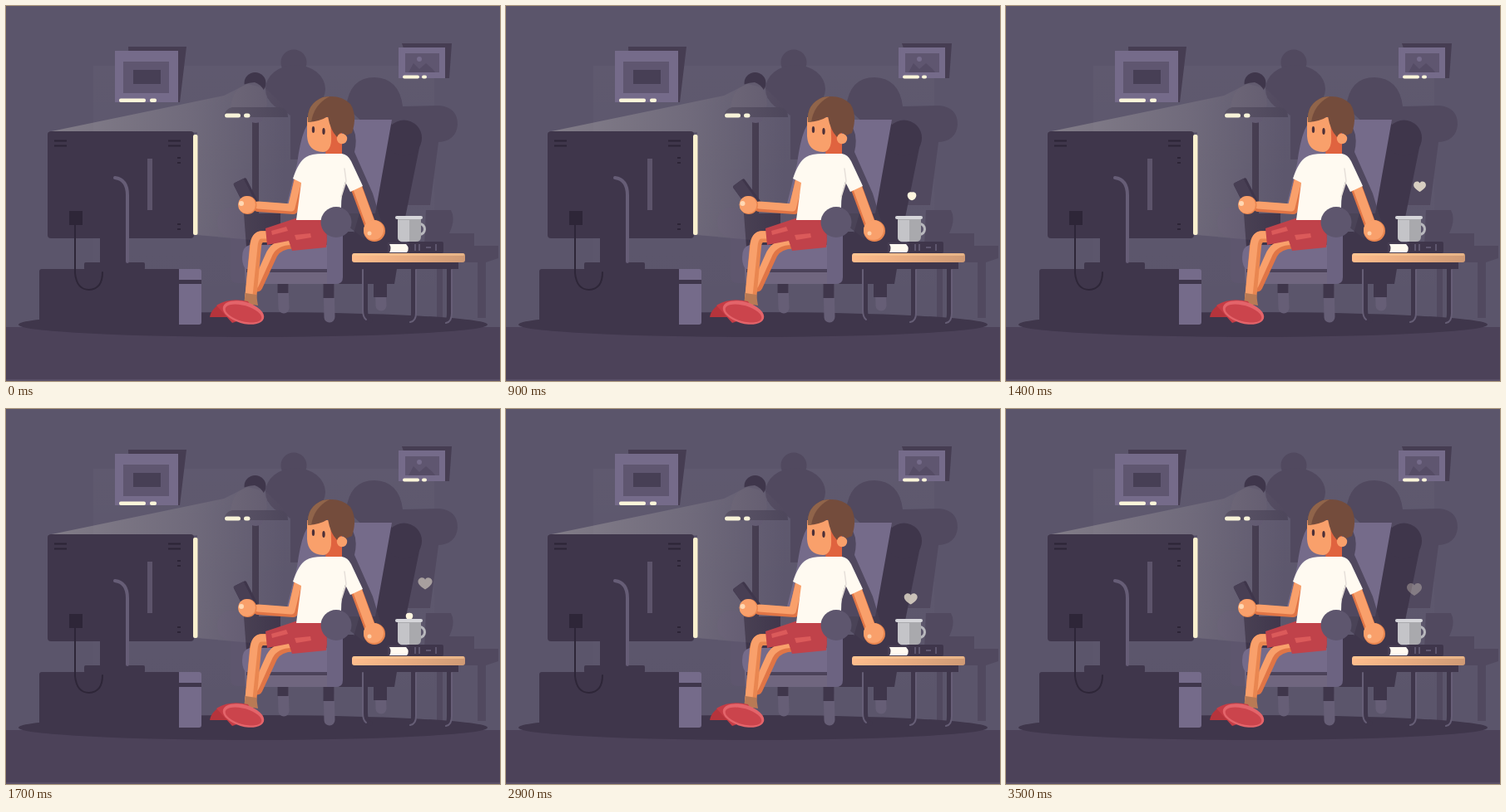
Write an HTML page that moves like this. It is 594 by 452 pixels and loops after 3.6 s.

```html
<!DOCTYPE html>
<html lang="en">
<head>
<meta charset="utf-8">
<title>Evening TV</title>
<style>
html, body { margin: 0; width: 100%; height: 100%; overflow: hidden; background: #5b556b; }
svg { display: block; width: 594px; height: 452px; }
.ink { fill: #3f364b; }
.mid { fill: #5e566e; }
.lilac { fill: #756b8a; }
.shade { fill: #51495f; }
.skin { fill: #f9a06b; }
.glow { fill: #fbf6da; }
.line { fill: none; stroke-linecap: round; stroke-linejoin: round; }
</style>
</head>
<body>
<svg viewBox="0 0 594 452">
  <defs>
    <linearGradient id="beamFill" gradientUnits="userSpaceOnUse" x1="60" y1="0" x2="335" y2="0">
      <stop offset="0" stop-color="#cbc7bf" stop-opacity=".34"/>
      <stop offset=".6" stop-color="#cbc7bf" stop-opacity=".16"/>
      <stop offset="1" stop-color="#cbc7bf" stop-opacity="0"/>
    </linearGradient>
    <linearGradient id="haloFill" x2="0" y2="1">
      <stop offset="0" stop-color="#fff" stop-opacity=".025"/>
      <stop offset="1" stop-color="#fff" stop-opacity="0"/>
    </linearGradient>
    <linearGradient id="wood">
      <stop offset="0" stop-color="#ffbd8c"/>
      <stop offset="1" stop-color="#cf9a75"/>
    </linearGradient>
  </defs>

  <!-- room -->
  <rect width="594" height="452" fill="#5b556b"/>
  <rect y="387" width="594" height="65" fill="#4c4259"/>
  <rect y="450" width="594" height="2" fill="#5a5068"/>
  <rect x="105" y="72" width="410" height="300" fill="url(#haloFill)"/>

  <!-- wall shadows -->
  <g class="shade">
    <circle cx="346" cy="68" r="15.5"/>
    <ellipse cx="348" cy="100" rx="36" ry="29"/>
    <path d="M314 110L342 132V185H362L382 110Z"/>
    <path d="M409 122Q413 86 443 86Q473 87 477 121L521 120Q543 122 543 143Q541 163 520 164L510 240H440V150Z"/>
    <path d="M505 246H535Q541 257 533 274H563V289H592V304L577 309V376H567V309H525V376H518V290H503Z"/>
  </g>
  <ellipse class="ink" cx="297" cy="384" rx="282" ry="15"/>

  <!-- pictures -->
  <path d="M147 49H217L209 116H150ZM476 45H536L533 87H490Z" fill="#463d52"/>
  <path class="lilac" d="M131 54H207V116H131ZM472 50H528V87H472Z"/>
  <path d="M141 67H196V105H141ZM480 57H521V80H480Z" fill="#5f5670"/>
  <rect x="153" y="77" width="33" height="17" fill="#473f55"/>
  <path class="ink" d="M484 80L490 69L497 76L505 69L513 76L516 80Z" opacity=".3"/>
  <circle class="lilac" cx="497" cy="64" r="3"/>
  <g class="glow">
    <rect x="136" y="111.500" width="32" height="4.500" rx="2"/>
    <rect x="173" y="111.500" width="8" height="4.500" rx="2"/>
    <rect x="477" y="83.500" width="20" height="4" rx="2"/>
    <rect x="500" y="83.500" width="6" height="4" rx="2"/>
  </g>

  <!-- lamp -->
  <rect class="ink" x="296" y="136" width="8" height="130"/>
  <circle class="ink" cx="299.500" cy="93" r="13"/>
  <path d="M262 134Q263 124 272 122H330Q339 124 339 134Z" fill="#4e475c"/>
  <path d="M270 122Q273 93 299 92Q313 97 314 118Q314 122 310 122Z" fill="#625b6f"/>
  <path class="mid" d="M292 134H309Q308 141 300 141Q293 141 292 134Z"/>
  <g class="glow">
    <rect x="263" y="129.500" width="19" height="5" rx="2.500"/>
    <rect x="286" y="129.500" width="7.500" height="5" rx="2.500"/>
  </g>

  <!-- armchair -->
  <g class="line" stroke-width="13">
    <path d="M333 330L334 364M450 330L451 361M388 330L389 375" stroke="#665e76"/>
    <path d="M333 330V346M388 330V352" stroke="#3f364b" stroke-linecap="butt"/>
    <path d="M450 330V351" stroke="#3f364b" stroke-width="16" stroke-linecap="butt"/>
  </g>
  <path class="ink" d="M460 140L498 166L480 255L467 335H400L425 250Z"/>
  <circle class="ink" cx="478.500" cy="159" r="21.500"/>
  <path class="lilac" d="M371 137H464L444 250H335L350 190Q357 137 371 137Z"/>
  <path d="M410 140Q425 150 419 176L441 226L452 262L430 280L385 245Z" fill="#453c51" opacity=".75"/>
  <path class="mid" d="M254 262A17 17 0 0 1 288 258L293 334H278Q270 334 270 326V279A17 17 0 0 1 254 262Z"/>
  <path class="ink" d="M286 250H330V290H289Z"/>
  <path d="M286 303H392V335H288Z" fill="#70667f"/>
  <path class="lilac" d="M293 288H390V319H293Q284 317 284 303Q284 290 293 288Z"/>
  <path class="ink" d="M289 317H388V321H289Z" opacity=".75"/>
  <path class="ink" d="M403 272H418V335H400Z"/>

  <path id="beam" d="M50 152L262 108L290 94L312 99L338 124L330 285L230 276V152Z" fill="url(#beamFill)"/>

  <!-- feet and legs -->
  <path d="M245 375Q247 363 262 357L282 364L272 375Z" fill="#b6343c"/>
  <g class="line" stroke-linecap="butt">
    <path d="M346 286Q327 286 320 299L302 338" stroke="#e07546" stroke-width="13"/>
    <path d="M346 284Q325 283 317 298L300 336" stroke="#f9a06b" stroke-width="8"/>
    <path d="M318 278H308Q301 279 300 290L294 354" stroke="#e98650" stroke-width="14"/>
    <path d="M318 276H306Q299 277 298 290L291.500 354" stroke="#f9a06b" stroke-width="9"/>
  </g>
  <path d="M288 346L301 348L303 361L286 358Z" fill="#b87a55"/>
  <path d="M253 361Q268 351 291 356L300 372L272 382Z" fill="#c53c45"/>
  <ellipse cx="285.500" cy="369.500" rx="25.500" ry="13" transform="rotate(16 285.500 369.500)" fill="#e4646a"/>
  <ellipse cx="285.500" cy="370.500" rx="22.500" ry="9.500" transform="rotate(16 285.500 370.500)" fill="#cb444c"/>

  <!-- shorts, head, shirt -->
  <path d="M312 268L348 256H382Q388 275 385 291L344 295L340 283L314 288Z" fill="#c0424a"/>
  <path d="M319 271L337 266L339 271L320 276ZM347 276L366 274L367 279L349 282Z" fill="#db5a5a"/>
  <path d="M387 150H404V180H384Z" fill="#e0633f"/>
  <path class="skin" d="M362 134H393V156Q391 176 381 176Q363 175 362 157Z"/>
  <path d="M390 134L400 153L402 178L384 176Q392 173 391 156Z" fill="#e0633f"/>
  <circle class="skin" cx="404" cy="160" r="6.200"/>
  <path d="M363 140Q361 118 381 110Q402 106 414 118Q423 132 416 153L409 156Q402 149 398 158Q390 150 387 133Q378 139 363 140Z" fill="#744c3c"/>
  <path d="M363 140Q361 118 381 110L389 109Q370 119 367 140Z" fill="#90644a"/>
  <g fill="#4c3038">
    <ellipse cx="369.500" cy="149" rx="1.700" ry="4"/>
    <ellipse cx="382" cy="151" rx="1.700" ry="4"/>
  </g>
  <path class="line" d="M420 215L438 264" stroke="#e07546" stroke-width="14"/>
  <path class="line" d="M421 215L439 264" stroke="#f9a06b" stroke-width="11"/>
  <circle cx="443" cy="271" r="13" fill="#e98650"/>
  <circle class="skin" cx="442" cy="270" r="12"/>
  <circle cx="437" cy="274" r="2.500" fill="#ffd0a8"/>
  <g id="arm">
    <g id="remote">
      <rect class="ink" x="-8" y="-15" width="17" height="39" rx="2"/>
      <path d="M-8 -13Q-8 -15 -6 -15H6V20H-8Z" fill="#483f54"/>
    </g>
    <path class="line" d="M352 211L345 245L303 242" stroke="#e07546" stroke-width="12" stroke-linecap="butt"/>
    <path class="line" d="M351 211L343 243L303 240" stroke="#f9a06b" stroke-width="9" stroke-linecap="butt"/>
    <circle cx="290.500" cy="240" r="11" fill="#e98650"/>
    <circle class="skin" cx="289.500" cy="239.500" r="10.500"/>
    <circle cx="283" cy="238" r="3" fill="#ffd8b4"/>
  </g>
  <path d="M361 182Q367 178 381 178H404Q411 179 415 187L429 217L414 224L408 212Q403 226 403 243Q384 244 380 258H349L355 213L345 208Q352 187 361 182Z" fill="#fffaf1"/>
  <path class="line" d="M407 196L409 211L403 230" stroke="#e6dfd9" stroke-width="1.500"/>

  <!-- near armrest -->
  <path d="M386 270H405V327Q405 335 397 335H386Z" fill="#6c6381"/>
  <circle class="mid" cx="397" cy="260.500" r="18.500"/>

  <!-- side table -->
  <rect class="ink" x="422" y="308" width="122" height="9"/>
  <g class="line" stroke="#3f364b" stroke-width="6">
    <path d="M432 312V366Q432 378 438 379M490 312V370Q490 379 486 380M533 312V370Q533 380 529 381"/>
  </g>
  <path class="line" d="M429 318V366Q429 375 433 378M493 318V370Q493 380 486 381M536 318V370Q536 381 529 382" stroke="#665e76" stroke-width="2"/>
  <rect x="416" y="298" width="136" height="11" rx="3" fill="url(#wood)"/>
  <rect x="417" y="298" width="134" height="3" rx="1.500" fill="#ffd09a" opacity=".5"/>
  <rect class="ink" x="482" y="284" width="44" height="14" rx="2"/>
  <path d="M492 287V295M497 287V295M505 291H511M517 287V295" stroke="#5e566e" stroke-width="2"/>
  <path d="M459 285H485V288H462V295H485V298H459Z" fill="#463d52"/>
  <path d="M461 287H481Q486 292 482 297H461Q464 292 461 287Z" fill="#fffaf1"/>

  <!-- steam puffs sit behind the mug -->
  <path class="puff" fill="#fff6df"/>
  <path class="puff" fill="#fff6df"/>
  <circle class="line" cx="497" cy="269" r="6.500" stroke="#b9b9be" stroke-width="3"/>
  <path d="M471 255H499V278Q499 284 493 284H477Q471 284 471 278Z" fill="#a9a9ad"/>
  <path d="M471 258H485V284H477Q471 284 471 278Z" fill="#c4c4c8"/>
  <rect x="468" y="253" width="33" height="4" rx="2" fill="#d6d6da"/>

  <rect id="dim" width="594" height="452" fill="#000" opacity=".17"/>

  <!-- television -->
  <rect class="ink" x="40" y="317" width="170" height="67" rx="3"/>
  <path class="lilac" d="M208 317H232Q235 317 235 320V381Q235 384 232 384H208Z"/>
  <rect class="ink" x="208" y="330" width="27" height="5"/>
  <rect class="ink" x="94" y="309" width="73" height="9" rx="2"/>
  <rect class="ink" x="50" y="151" width="176" height="129" rx="4"/>
  <rect x="225" y="155" width="5.500" height="121" rx="2" fill="#f9f0cf"/>
  <rect x="170" y="184" width="6" height="62" fill="#5d546b"/>
  <path class="ink" d="M113 222H148V310H113Z"/>
  <path class="line" d="M131 207Q146 209 146 228V308" stroke="#665d76" stroke-width="4" stroke-linecap="butt"/>
  <path d="M58 162.500H73M58 168.500H73M195 162.500H210M195 168.500H210M206 183H210M206 189H210M206 263H210M206 269H210" stroke="#2c2436" stroke-width="2"/>
  <rect x="76" y="247" width="16" height="17" fill="#2e2638"/>
  <path class="line" d="M83 264V322Q85 342 100 342Q116 341 116 321" stroke="#2e2638" stroke-width="2"/>
</svg>
<script>
const LOOP = 3600;
const get = id => document.getElementById(id);
const puffs = document.querySelectorAll('.puff');

// Heart outline; dip runs from 0 (round) to 1 (full notch and point).
function heart(dip) {
  const top = -7 + 3.5 * dip;
  const tip = 7 + 2 * dip;
  const side = 7 + 2 * dip;
  return `M0 ${top}C${4 - 2 * dip} ${-7 - dip} ${side} -6 ${side} -1` +
    `C${side} 3 4 ${tip - 2.5 * dip} 0 ${tip}` +
    `C-4 ${tip - 2.5 * dip} ${-side} 3 ${-side} -1` +
    `C${-side} -6 ${2 * dip - 4} ${-7 - dip} 0 ${top}Z`;
}

// Linear interpolation through [time, value] keys.
function track(t, keys) {
  if (t <= keys[0][0]) return keys[0][1];
  for (let i = 1; i < keys.length; i++) {
    const [a, u] = keys[i - 1], [b, v] = keys[i];
    if (t <= b) return u + (v - u) * (t - a) / (b - a);
  }
  return keys[keys.length - 1][1];
}

const steam = [
  {
    x: [[150, 484], [900, 488], [1100, 491], [1700, 504], [2000, 510]],
    y: [[150, 259], [300, 248], [900, 229], [1100, 224], [1700, 209], [2000, 202]],
    size: [[150, .5], [900, .72], [1100, .7], [1700, .95], [2000, 1]],
    fade: [[150, 0], [160, 1], [1150, 1], [1700, .5], [2000, 0]],
    dip: [[850, 0], [1100, 1]]
  },
  {
    x: [[1550, 485], [2500, 485], [3200, 488], [3600, 492]],
    y: [[1550, 259], [1700, 250], [2500, 235], [3200, 222], [3600, 214]],
    size: [[1550, .5], [1700, .6], [2500, .73], [3200, 1]],
    fade: [[1550, 0], [1560, 1], [2550, 1], [3200, .45], [3500, .3], [3600, 0]],
    dip: [[2250, 0], [2500, 1]]
  }
];

function draw(now) {
  const t = now % LOOP;

  const dark = (t >= 1000 && t < 1200) || (t >= 3000 && t < 3300);
  get('dim').style.display = dark ? '' : 'none';
  get('beam').style.display = dark ? 'none' : '';

  const press = track(t, [[700, 0], [850, 1], [1100, 1], [1300, 0], [2700, 0], [2850, 1], [2980, 1], [3150, 0]]);
  get('arm').setAttribute('transform', `translate(${press * 1.5} 0)`);
  get('remote').setAttribute('transform', `translate(${287 - press} ${224 + press}) rotate(${-27 - press * 9})`);

  steam.forEach((s, i) => {
    const at = key => track(t, s[key]);
    puffs[i].setAttribute('d', heart(at('dip')));
    puffs[i].setAttribute('opacity', at('fade'));
    puffs[i].setAttribute('transform', `translate(${at('x')} ${at('y')}) scale(${at('size')})`);
  });
}

const start = performance.now();
function loop() {
  draw(performance.now() - start);
  requestAnimationFrame(loop);
}
loop();
</script>
</body>
</html>
```
